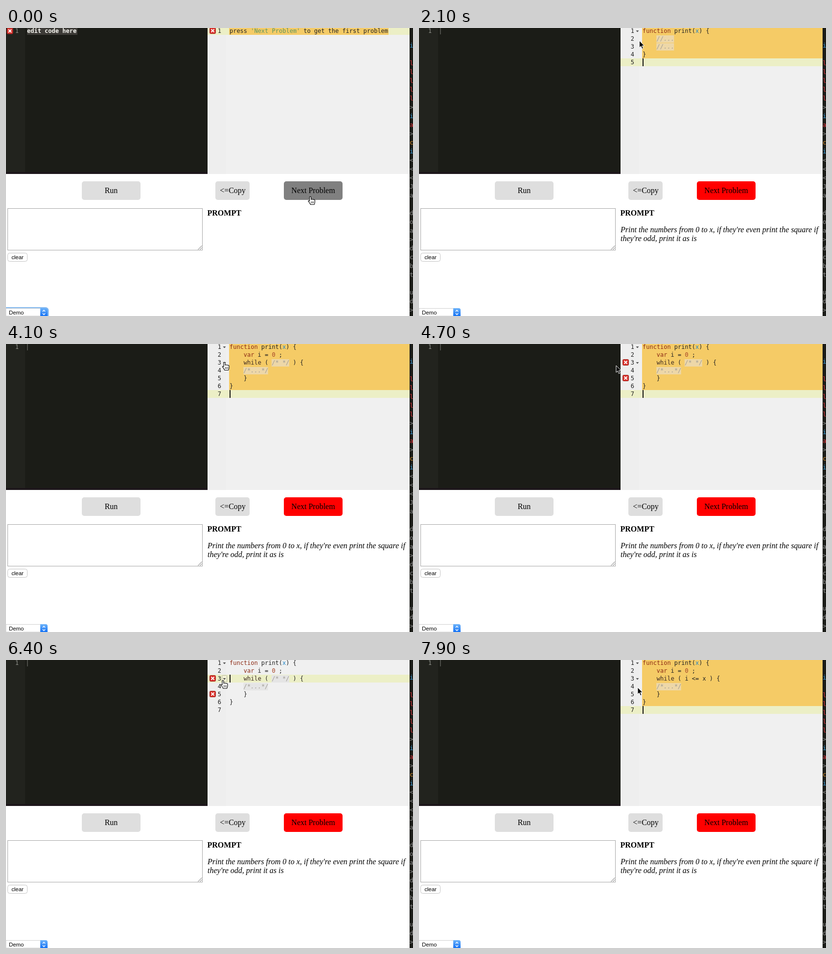
An HTML page that plays this animation: 832x588 px, repeating every 8 s.

```html
<!DOCTYPE html>
<html lang="en">
<head>
<meta charset="utf-8">
<title>Code steps</title>
<style>
html, body { margin: 0; width: 100%; height: 100%; overflow: hidden; background: #fff; }
svg { display: block; width: 832px; height: 588px; }
text { white-space: pre; }
.mono { font: 12px "DejaVu Sans Mono", monospace; }
.edge { font: 13px "DejaVu Sans Mono", monospace; }
.serif { font: 16px "Liberation Serif", serif; fill: #000; }
.ui { font: 11.4px "Liberation Sans", sans-serif; fill: #000; }
.bold { font-weight: bold; }
.italic { font-style: italic; }
.mid { text-anchor: middle; }
.end { text-anchor: end; }
.plain { fill: #222; }
.type { fill: #8c2a14; }
.key { fill: #3d2a22; }
.str { fill: #5a9460; }
.num { fill: #a8482a; }
.arg { fill: #2287c9; }
.note { fill: #a09c94; font-style: italic; }
</style>
</head>
<body>
<svg viewBox="0 0 832 588">
  <defs>
    <linearGradient id="blue" x2="0" y2="1">
      <stop stop-color="#6db3fa"/><stop offset="1" stop-color="#1673f5"/>
    </linearGradient>
    <g id="error">
      <rect x="-6" y="-6" width="12" height="12" rx="2" fill="#d9302b" stroke="#9c2a24"/>
      <path d="M-3-3 3 3M3-3-3 3" stroke="#fff" stroke-width="2"/>
    </g>
  </defs>

  <!-- left editor -->
  <rect width="412" height="298" fill="#1b1c17"/>
  <rect width="39" height="294" fill="#22231e"/>
  <rect y="294" width="412" height="4" fill="#1d161b"/>
  <text class="mono end" x="26" y="10" fill="#8f908a">1</text>
  <g id="intro">
    <rect x="43" width="103" height="14" fill="#3d3b37"/>
    <text class="mono bold" x="43" y="10" fill="#f8f8f2">edit code here</text>
    <use href="#error" x="8" y="6"/>
  </g>
  <rect id="leftCaret" x="43" width="1.5" height="13" fill="#5c5d58"/>

  <!-- right editor -->
  <rect x="412" width="413" height="298" fill="#f0f0f0"/>
  <rect x="412" width="38" height="298" fill="#eeeeee"/>
  <g id="code"></g>

  <!-- terminal edge -->
  <rect x="825" width="7" height="588" fill="#1b1c18"/>
  <g id="edge" class="edge"></g>

  <!-- controls -->
  <rect x="155" y="313" width="120" height="38" rx="5" fill="#dedede"/>
  <text class="serif mid" x="215" y="337">Run</text>
  <rect x="428" y="313" width="70" height="38" rx="5" fill="#dedede"/>
  <text class="serif mid" x="463.5" y="337">&lt;=Copy</text>
  <rect id="next" x="568" y="313" width="120" height="38" rx="5"/>
  <text class="serif mid" x="628" y="337">Next Problem</text>

  <rect x="3.5" y="368.5" width="398" height="85" fill="#fff" stroke="#a6a6a6"/>
  <path d="M392.5 452.5l8-8M396.5 452.5l4-4" stroke="#666"/>
  <rect x="3.5" y="459.5" width="40" height="17" rx="4" fill="#fff" stroke="#c4c4c4"/>
  <text class="ui mid" x="23.5" y="472">clear</text>

  <text class="serif bold" x="411.5" y="383">PROMPT</text>
  <g id="prompt">
    <text class="serif italic" x="412" y="417">Print the numbers from 0 to x, if they're even print the square if</text>
    <text class="serif italic" x="412" y="435">they're odd, print it as is</text>
  </g>

  <rect id="ring" x="-4" y="571.5" width="90" height="24" rx="5" fill="none" stroke="#82b8f0" stroke-width="3"/>
  <path d="M0 572.5H81Q84.5 572.5 84.5 576V588H0Z" fill="#fff" stroke="#d0d0d0"/>
  <path d="M70 572H81Q85 572 85 576V588H70Z" fill="url(#blue)"/>
  <path d="M75 579l2.5-3 2.5 3M75 582.5l2.5 3 2.5-3" fill="none" stroke="#fff" stroke-width="1.4"/>
  <text class="ui" x="6" y="585">Demo</text>

  <g id="pointer"></g>
</svg>
<script>
const $ = id => document.getElementById(id);
const LOOP = 8000, CHAR = 7.2, ROW = 16, LEFT = 457;

const start = ["press 'Next Problem' to get the first problem"];
const wrap = body => ["function print(x) {", ...body.map(s => "    " + s), "}", ""];
const loop = test => wrap(["var i = 0 ;", `while ( ${test} ) {`, "/*...*/", "}"]);

// when, lines, rows with errors, clicked row (otherwise everything is selected)
const phases = [
  { t: 0, code: start, errors: [0] },
  { t: 200, code: wrap(["//..."]) },
  { t: 1900, code: wrap(["//...", "//..."]) },
  { t: 2300, code: wrap(["var i = 0 ;", "//..."]) },
  { t: 3700, code: loop("/* */") },
  { t: 4600, code: loop("/* */"), errors: [2, 4] },
  { t: 5800, code: loop("/* */"), errors: [2, 4], row: 2 },
  { t: 6800, code: loop("i <= x"), errors: [2, 4] },
  { t: 7200, code: loop("i <= x") }
];

// time, x, y, shape
const path = [
  [0, 622, 344, "hand"], [300, 622, 344, "hand"], [500, 612, 300, "arrow"],
  [700, 596, 225, "beam"], [800, 586, 188, "beam"], [1000, 537, 106, "beam"],
  [1300, 495, 56, "beam"], [1600, 454, 30, "arrow"], [1700, 450.5, 26, "arrow"],
  [3300, 450.5, 26, "arrow"], [3600, 446.5, 37, "hand"], [4300, 446.5, 37, "hand"],
  [4400, 438, 39, "arrow"], [4700, 403, 44, "arrow"], [5100, 432, 40, "arrow"],
  [5400, 457, 37, "beam"], [5900, 457, 37, "beam"], [6200, 443.5, 41.5, "hand"],
  [6800, 443.5, 41.5, "hand"], [7300, 446, 50, "arrow"], [7700, 447, 56, "arrow"],
  [LOOP, 447, 56, "arrow"]
];

const shapes = {
  hand: `<path d="M-1.5 1Q0-.6 1.5 1V6q1.3-1 2.6 0q1.3-.7 2.6.4q2-.4 2.7 1V11.5Q9.2 14 8 16.5H.5Q-.7 13-4 9.8q-.2-2.2 2.500-.6Z" fill="#fff" stroke="#000" stroke-width="1.1"/>
    <path d="M2 10v4M4.3 10v4M6.6 10v4" stroke="#000" stroke-width=".8"/>`,
  arrow: `<path d="M0 0V14L3.2 11 5.6 16.5 8 15.4 5.6 10.2H10Z" fill="#000" stroke="#fff"/>`,
  beam: ["#fff", "#111"].map((c, i) =>
    `<path d="M-3-7.5Q0-7.5 0-5Q0-7.5 3-7.5M0-5V5M-3 7.5Q0 7.5 0 5Q0 7.5 3 7.5M-1.5 2h3" fill="none" stroke="${c}" stroke-width="${i ? 1.2 : 2.4}"/>`).join("")
};

const rect = (x, y, w, h, fill) =>
  `<rect x="${x}" y="${y}" width="${w}" height="${h}" fill="${fill}"/>`;
const safe = s => s.replace(/&/g, "&amp;").replace(/</g, "&lt;");
const tokens = /\/\*.*?\*\/|\/\/\.+|'[^']*'|\b(?:function|var|while)\b|x(?=\) \{)|\d|[^\s\d]/g;

function kind(s) {
  if (/^\/[/*]/.test(s)) return "note";
  if (s[0] === "'") return "str";
  if (/^(function|var)$/.test(s)) return "type";
  if (s === "while") return "key";
  return /\d/.test(s) ? "num" : "plain";
}

function drawLine(line, row, selected) {
  const y = row * ROW;
  let out = "";
  for (const m of line.matchAll(tokens)) {
    const x = LEFT + m.index * CHAR;
    let type = kind(m[0]);
    if (line.startsWith("x) {", m.index)) type = "arg";
    if (type === "note")
      out += rect(x - .5, y - 1, m[0].length * CHAR, 15, selected ? "#edd7a8" : "#e5e5e5");
    out += `<text class="mono ${type}" x="${x}" y="${y + 10}">${safe(m[0])}</text>`;
  }
  return out;
}

function drawCode({ code, errors = [], row }) {
  const selected = row === undefined;
  const active = selected ? code.length - 1 : row;
  const top = active * ROW - 2;
  let out = rect(412, top, 413, ROW, "#ecefc6");
  if (selected)
    out += code.length > 1 ? rect(LEFT - 1, 0, 369, top, "#f5cb66")
                           : rect(LEFT - 1, 0, 326, 14, "#f5cb66");
  code.forEach((line, i) => {
    const y = i * ROW;
    out += drawLine(line, i, selected);
    out += `<text class="mono end" x="440" y="${y + 10}" fill="#222">${i + 1}</text>`;
    if (line.endsWith("{")) {
      if (i === row)
        out += `<rect x="441.5" y="${y - .5}" width="10" height="13" rx="2" fill="#f3f2d5" stroke="#b5b5a0"/>`;
      out += `<path d="M443.5 ${y + 5}h6l-3 3.5Z" fill="#555"/>`;
    }
    if (errors.includes(i)) out += `<use href="#error" x="422.5" y="${y + 5.5}"/>`;
  });
  return out + rect(LEFT, Math.max(0, top), selected && code.length === 1 ? 0 : 2, ROW, "#111");
}

function drawEdge() {
  const letters = "i lllll>ia>ci<<<Ja doa>dcbt ud>";
  const tints = { i: "#3b9fdc", l: "#d9353c", c: "#d08a2c" };
  return [...letters].map((c, k) => {
    const tint = k === 9 ? "#d9353c" : k > 14 ? "#8d8d8d" : tints[c] || "#8d8d8d";
    return `<text x="825" y="${39.5 + 18 * k}" fill="${tint}">${safe(c)}</text>`;
  }).join("");
}

function place(t) {
  const i = path.findIndex(p => p[0] > t);
  const [t0, x0, y0, shape] = path[i - 1], [t1, x1, y1] = path[i];
  const k = (t - t0) / (t1 - t0);
  return [x0 + (x1 - x0) * k, y0 + (y1 - y0) * k, shape];
}

const show = (id, on) => $(id).setAttribute("visibility", on ? "visible" : "hidden");
let shown, lastShape;

function draw(now) {
  const t = Math.floor(now % LOOP / 100) * 100;
  const phase = phases.findLast(p => p.t <= t);
  if (phase !== shown) {
    shown = phase;
    const idle = phase === phases[0];
    $("code").innerHTML = drawCode(phase);
    $("next").setAttribute("fill", idle ? "#808080" : "#f00");
    show("intro", idle);
    show("ring", idle);
    show("prompt", !idle);
    show("leftCaret", !idle);
  }
  const [x, y, shape] = place(t);
  if (shape !== lastShape) $("pointer").innerHTML = shapes[lastShape = shape];
  $("pointer").setAttribute("transform", `translate(${x} ${y})`);
}

$("edge").innerHTML = drawEdge();
const begin = performance.now();
function tick() {
  draw(performance.now() - begin);
  requestAnimationFrame(tick);
}
tick();
</script>
</body>
</html>
```
